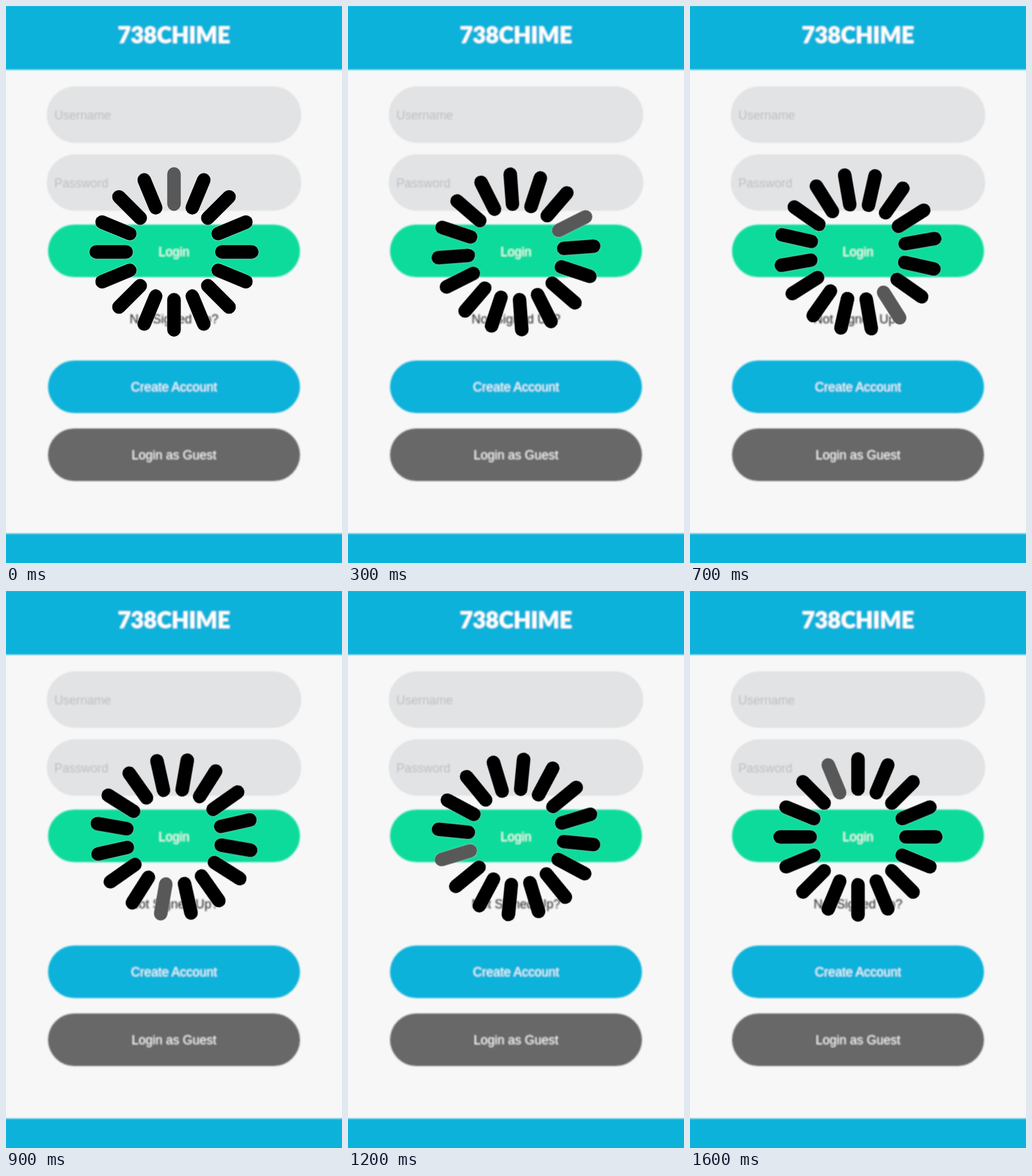
Animation of 480 by 795 pixels, one loop 1.7 s. Source, as an HTML page:

```html
<!DOCTYPE html>
<html lang="en">
<head>
<meta charset="utf-8">
<title>Login loading</title>
<style>
  html, body { margin: 0; width: 100%; height: 100%; overflow: hidden; background: #f7f7f7; }
  svg { display: block; width: 480px; height: 795px; }
  text { font: 18px "Liberation Sans", Arial, sans-serif; fill: #fff; }
  .title { font: 900 32px Lato, sans-serif; }
  .mid { text-anchor: middle; }
  .hint { font-size: 17.6px; fill: #bcbcc0; }
  .note { fill: #222; }
  .bar { fill: #0cb2db; }
  .field { fill: #e2e3e5; stroke: #dadbdc; }
  .rim { stroke: #fff; stroke-opacity: .5; stroke-width: 20.6; }
  .spoke { stroke: #000; stroke-width: 19.4; }
  .lit { stroke: #585858; }
  .wheel { stroke-linecap: round; animation: spin 1.7s steps(17) infinite; }
  /* 17 steps of 337.5 / 16 degrees, then a jump back to the start */
  @keyframes spin {
    from { transform: rotate(0deg); }
    to { transform: rotate(358.59375deg); }
  }
</style>
</head>
<body>
<svg viewBox="0 0 480 795">
  <defs>
    <filter id="soft" filterUnits="userSpaceOnUse" x="-20" y="-20" width="520" height="835">
      <feGaussianBlur stdDeviation="1.3"/>
    </filter>
    <g id="spoke">
      <path class="rim" d="M0-111.2V-68.3"/>
      <path d="M0-111.2V-68.3"/>
    </g>
  </defs>

  <rect width="480" height="795" fill="#f7f7f7"/>
  <g filter="url(#soft)">
    <rect class="bar" x="-20" y="-1" width="520" height="92"/>
    <rect class="bar" x="-20" y="753" width="520" height="62"/>
    <text class="title mid" x="240" y="53">738CHIME</text>

    <rect class="field" x="59" y="115.5" width="362" height="79" rx="39.5"/>
    <rect class="field" x="59" y="212.5" width="362" height="79" rx="39.5"/>
    <text class="hint" x="69" y="162">Username</text>
    <text class="hint" x="69" y="259">Password</text>

    <rect x="60" y="312" width="360" height="75" rx="37.5" fill="#0cdb9c"/>
    <text class="mid" x="240" y="357">Login</text>
    <text class="note mid" x="240" y="453">Not Signed Up?</text>

    <rect class="bar" x="60" y="506" width="360" height="75" rx="37.5"/>
    <text class="mid" x="240" y="550">Create Account</text>
    <rect x="60" y="603" width="360" height="75" rx="37.5" fill="#686868"/>
    <text class="mid" x="240" y="647">Login as Guest</text>
  </g>

  <g transform="translate(240 351)">
    <g class="wheel" id="wheel"></g>
  </g>
</svg>
<script>
  const spokes = 16;
  document.getElementById("wheel").innerHTML = Array.from({ length: spokes }, (_, i) =>
    `<use href="#spoke" class="spoke${i ? "" : " lit"}" transform="rotate(${i * 360 / spokes})"/>`
  ).join("");
</script>
</body>
</html>
```
